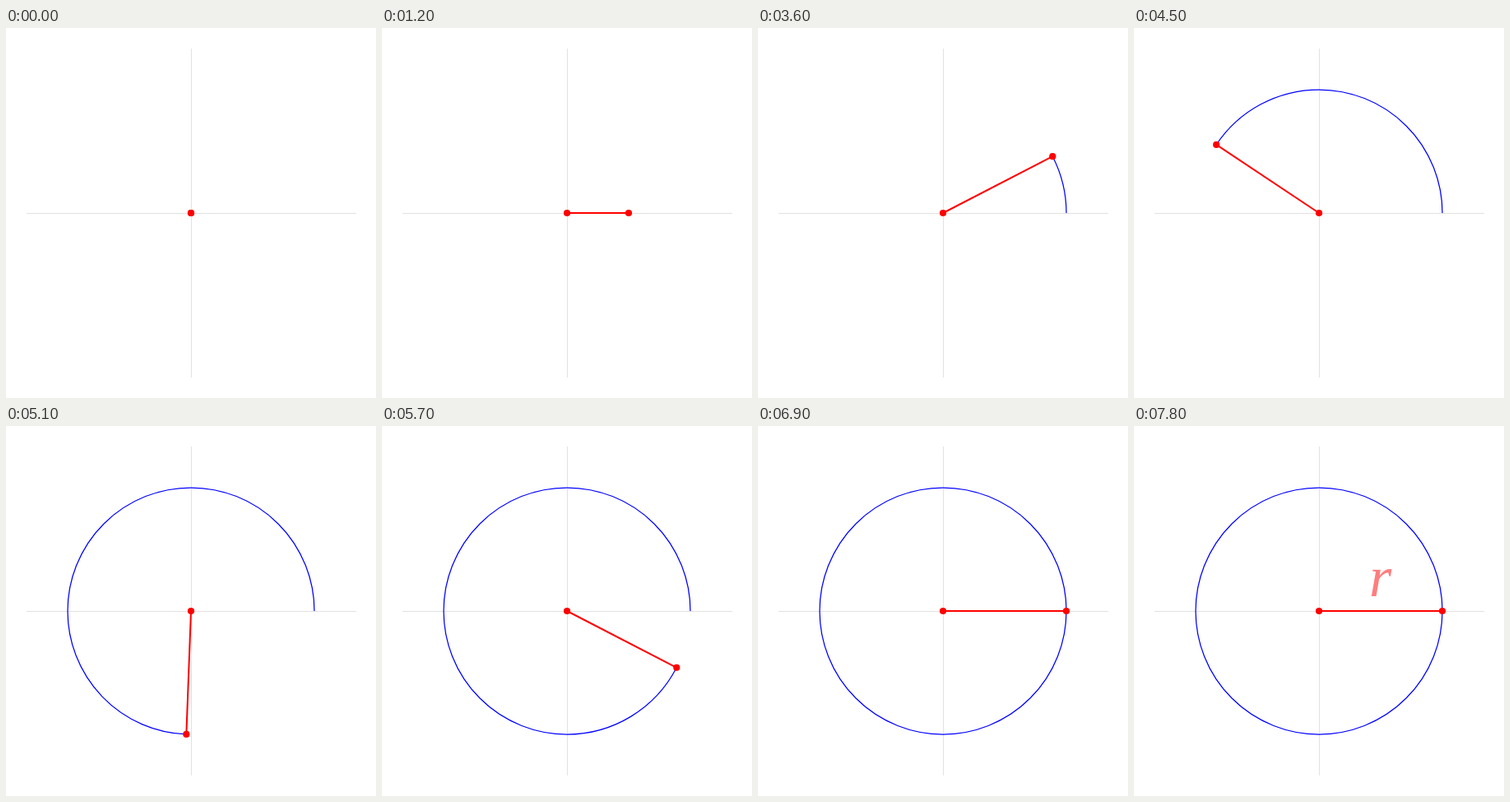
Recreate the animation shown at these times as an HTML page. Size 450 px wide and 450 px high, loop 8000 ms.

```html
<!DOCTYPE html>
<html lang="en">
<head>
<meta charset="utf-8">
<title>Circle and radius</title>
<style>
  html, body { margin: 0; width: 100%; height: 100%; overflow: hidden; background: #fff; }
  svg { display: block; width: 100%; height: 100%; }
  .axis { stroke: #e1e1e1; stroke-width: 1; }
  #trace { fill: none; stroke: #00f; stroke-width: 1.25; }
  #radius { stroke: #f00; stroke-width: 2; }
  .dot { fill: #f00; }
  #label { fill: #f00; font: italic 70px "Liberation Serif", "Times New Roman", serif; }
</style>
</head>
<body>
<svg viewBox="0 0 450 450">
  <path class="axis" d="M25 225.5H426M225.5 25V425"/>
  <!-- flipped so that the trace runs counterclockwise -->
  <circle id="trace" cx="225" cy="225" r="150" pathLength="1" transform="matrix(1 0 0 -1 0 450)"/>
  <line id="radius" x1="225" y1="225" x2="225" y2="225"/>
  <circle class="dot" cx="225" cy="225" r="4.1"/>
  <circle class="dot" id="tip" cx="225" cy="225" r="4.1"/>
  <text id="label" x="286" y="207" opacity="0">r</text>
</svg>
<script>
  const LOOP = 8000, STEP = 300, CENTER = 225, RADIUS = 150;
  const GROW = [0, 2400], TURN = [2400, 6900], FADE = [6900, 8700];

  const [trace, radius, tip, label] =
    ["trace", "radius", "tip", "label"].map(id => document.getElementById(id));

  const set = (el, attrs) => {
    for (const key in attrs) el.setAttribute(key, attrs[key]);
  };

  const easeInOut = x => x < 0.5 ? 4 * x ** 3 : 1 - 4 * (1 - x) ** 3;

  const progress = (time, [start, end]) =>
    easeInOut(Math.min(1, Math.max(0, (time - start) / (end - start))));

  function draw(time) {
    const length = RADIUS * progress(time, GROW);
    const turn = progress(time, TURN);
    const angle = turn * 2 * Math.PI;
    const x = CENTER + length * Math.cos(angle);
    const y = CENTER - length * Math.sin(angle);

    set(radius, { x2: x, y2: y });
    set(tip, { cx: x, cy: y });
    set(trace, {
      visibility: turn > 0 ? "visible" : "hidden",
      "stroke-dasharray": turn < 1 ? `${turn} 2` : "none"
    });
    set(label, { opacity: progress(time, FADE) });
  }

  const origin = performance.now();

  function tick() {
    const time = (performance.now() - origin) % LOOP;
    draw(Math.floor(time / STEP) * STEP);
    requestAnimationFrame(tick);
  }

  draw(0);
  requestAnimationFrame(tick);
</script>
</body>
</html>
```
